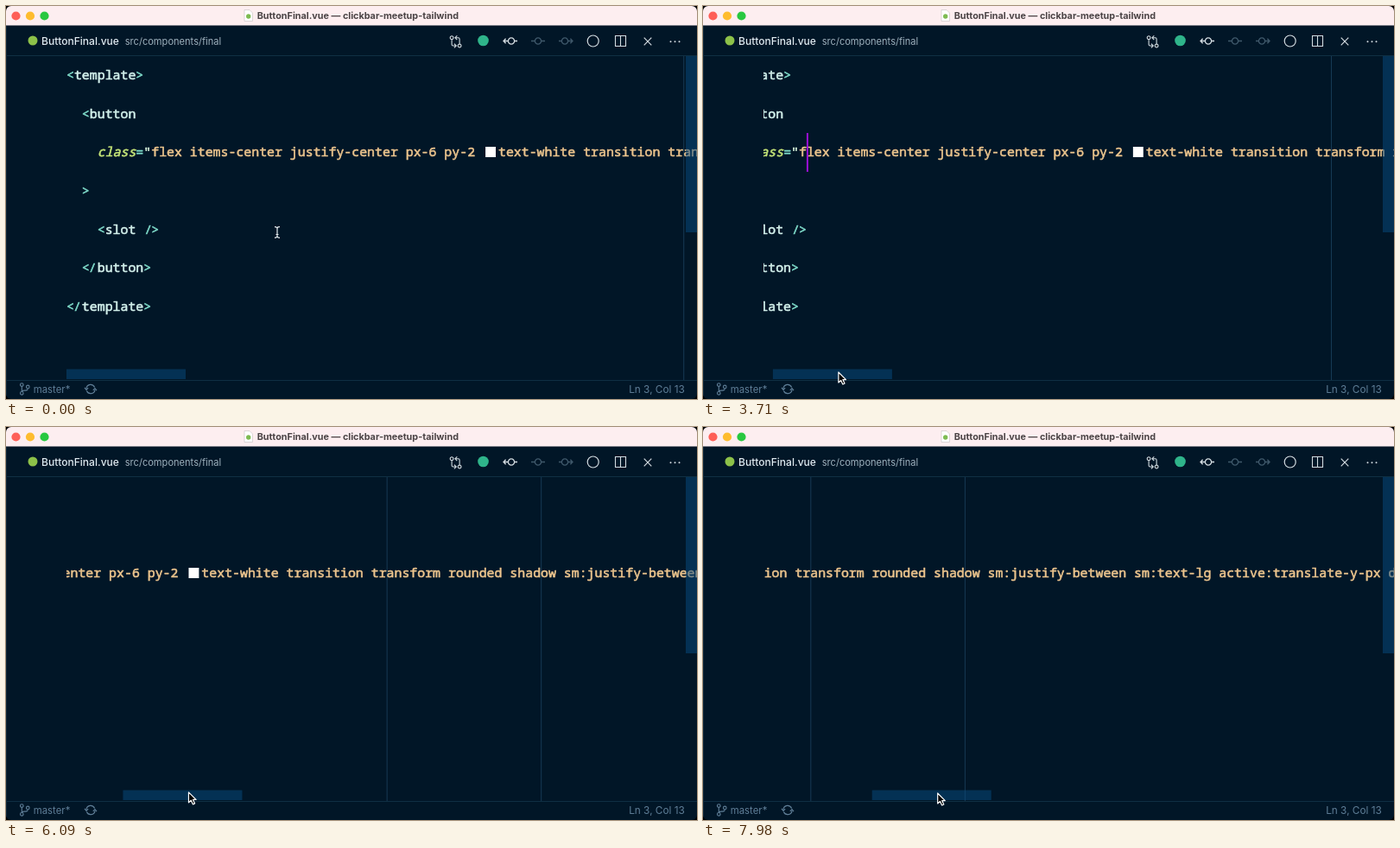
An HTML page with a canvas that plays this animation: 800x455 px, repeating every 8000 ms.

```html
<!DOCTYPE html>
<html lang="en">
<head>
<meta charset="utf-8">
<title>Editor scroll</title>
<style>
  html, body { margin: 0; width: 100%; height: 100%; overflow: hidden; background: #000; }
  canvas { display: block; width: 800px; height: 455px; }
</style>
</head>
<body>
<canvas id="stage"></canvas>
<script>
const W = 800, H = 455, LOOP = 8000, STEP = 70;
const canvas = document.getElementById('stage');
const ctx = canvas.getContext('2d');
const dpr = window.devicePixelRatio || 1;
canvas.width = W * dpr;
canvas.height = H * dpr;

const BG = '#011627', EDGE = '#0f2f43', ICON = '#d3dbe0', DIM = '#3f586a', STATUS = '#5f7e97';
const BRACKET = '#7fdbca', TAG = '#d3f0eb', ATTR = '#c5e478', QUOTE = '#d9f5dd', STRING = '#ecc48d';
const SANS = 'Inter, sans-serif';

// Code grid
const EM = 14.88, CELL = EM * 0.6, LEFT = 70, TOP = 57, BOTTOM = 433;
const BASE = 85.2, PITCH = 44.6;
const MONO = `${EM}px "Noto Sans Mono", monospace`;
const LEAD = 'flex items-center justify-center px-6 py-2 ';
const TAIL = 'text-white transition transform rounded shadow sm:justify-between ' +
             'sm:text-lg active:translate-y-px disabled:opacity-50';

// Pointer path: time, x, y
const PATH = [
  [0, 314, 262], [900, 314, 262], [2100, 148, 413], [2300, 148, 413],
  [2600, 146, 424], [2750, 146, 424], [3710, 156.9, 424], [4410, 168.9, 423],
  [5320, 190.9, 424], [6860, 233.8, 421.7], [7980, 271.7, 424]
];
const GRAB_X = 146, RATIO = 5.25, DRAG_START = 2750;

// Monotone cubic interpolation of one column of PATH
function track(t, col) {
  const slope = i => (PATH[i + 1][col] - PATH[i][col]) / (PATH[i + 1][0] - PATH[i][0]);
  const tangent = i => {
    if (i === 0) return slope(0);
    if (i === PATH.length - 1) return slope(i - 1);
    const a = slope(i - 1), b = slope(i);
    return a * b <= 0 ? 0 : 2 * a * b / (a + b);
  };
  let i = 0;
  while (i < PATH.length - 2 && t >= PATH[i + 1][0]) i++;
  const d = PATH[i + 1][0] - PATH[i][0];
  const u = Math.min(1, (t - PATH[i][0]) / d), v = 1 - u;
  return PATH[i][col] * (1 + 2 * u) * v * v + tangent(i) * d * u * v * v +
         PATH[i + 1][col] * u * u * (3 - 2 * u) - tangent(i + 1) * d * u * u * v;
}

function rect(x, y, w, h, color) {
  ctx.fillStyle = color;
  ctx.fillRect(x, y, w, h);
}

function disc(x, y, r, color) {
  ctx.fillStyle = color;
  ctx.beginPath();
  ctx.arc(x, y, r, 0, Math.PI * 2);
  ctx.fill();
}

function label(text, x, y, font, color, align = 'left') {
  ctx.font = font;
  ctx.fillStyle = color;
  ctx.textAlign = align;
  ctx.fillText(text, x, y);
}

// Outline icon, path given around its own centre
function icon(x, y, path, color, width = 1.1) {
  ctx.save();
  ctx.translate(x, y);
  ctx.strokeStyle = color;
  ctx.lineWidth = width;
  ctx.stroke(new Path2D(path));
  ctx.restore();
}

const ring = (x, y, r) => `M${x + r} ${y}a${r} ${r} 0 1 0 ${-2 * r} 0a${r} ${r} 0 1 0 ${2 * r} 0`;

const COMPARE = ring(-4.4, -4.3, 1.9) + ring(4.6, 5, 1.9) +
  'M-4.4 -2.4V3.5Q-4.4 5 -2.9 5H0.6M-1.6 2.6L0.8 5L-1.6 7.4' +
  'M4.6 3.1V-2.8Q4.6 -4.3 3.1 -4.3H-0.4M1.8 -6.7L-0.6 -4.3L1.8 -1.9';
const COMMIT = ring(0, 0, 3.6) + 'M-8 0H-3.6M3.6 0H8';
const PREV = ring(1, 0, 3.6) + 'M-8 0H-2.6M4.6 0H8M-5.4 -2.8L-8 0L-5.4 2.8';
const NEXT = ring(-1, 0, 3.6) + 'M-8 0H-4.6M2.6 0H8M5.4 -2.8L8 0L5.4 2.8';
const SPLIT = 'M-6 -6H6V6H-6ZM0 -6V6';
const CLOSE = 'M-4.3 -4.3L4.3 4.3M4.3 -4.3L-4.3 4.3';
const BRANCH = ring(-3.2, -4.8, 1.8) + ring(-3.2, 5, 1.8) + ring(3.8, -2.4, 1.8) +
  'M-3.2 -3V3.2M3.8 -0.6Q3.8 1.8 1 1.8H-0.6Q-3.2 1.8 -3.2 3.2';
const SYNC = 'M-5 -0.8A5 5 0 0 1 4.6 -2M5 0.8A5 5 0 0 1 -4.6 2' +
  'M-7 -1.6L-5 0.8L-2.8 -1.4M7 1.6L5 -0.8L2.8 1.4';

function drawTitleBar() {
  rect(0, 0, W, 22.5, '#fdeef0');
  ['#fe5f57', '#febc2e', '#28c840'].forEach((c, i) => disc(11.5 + i * 16.5, 11.5, 5.1, c));
  ctx.fillStyle = '#fff';
  ctx.strokeStyle = '#cfc8c9';
  ctx.lineWidth = 0.7;
  const page = new Path2D('M276 4.5H282L285.5 8V17.5H276Z');
  ctx.fill(page);
  ctx.stroke(page);
  disc(280.7, 12, 2.7, '#7dbb52');
  label('ButtonFinal.vue — clickbar-meetup-tailwind', 407.3, 15.2, `700 10.8px ${SANS}`, '#4b4446', 'center');
}

function drawTabBar() {
  rect(0, TOP, W, 1, EDGE);
  disc(31, 40, 5.5, '#8dc149');
  label('ButtonFinal.vue', 41, 45.3, `500 12.05px ${SANS}`, '#e0eaf0');
  label('src/components/final', 137.7, 45.3, `11.1px ${SANS}`, '#9fb1bd');
  icon(520.5, 41, COMPARE, ICON);
  disc(552.5, 40, 6.3, '#2fb48a');
  icon(584, 40.5, PREV, ICON, 1.3);
  icon(616, 40.5, COMMIT, DIM, 1.3);
  icon(648, 40.5, NEXT, DIM, 1.3);
  icon(679.7, 40.5, ring(0, 0, 6.5), ICON, 1.2);
  icon(711.5, 40.5, SPLIT, ICON);
  icon(743, 41, CLOSE, ICON, 1.2);
  for (let i = -1; i <= 1; i++) disc(774.5 + i * 5, 41.2, 1, ICON);
}

function drawStatusBar() {
  rect(0, BOTTOM, W, 1, EDGE);
  icon(21.5, 443.3, BRANCH, STATUS);
  label('master*', 31.7, 447.6, `11.4px ${SANS}`, STATUS);
  icon(98, 443.5, SYNC, STATUS, 1.2);
  label('Ln 3, Col 13', 785.8, 447.6, `11.8px ${SANS}`, STATUS, 'right');
}

// Parts are [column, text, colour, optional font style, optional nudge].
// A thin stroke gives the medium weight the font lacks.
function codeLine(row, parts) {
  ctx.lineWidth = 0.6;
  ctx.lineJoin = 'round';
  for (const [col, text, color, style = '', nudge = 0] of parts) {
    const x = LEFT + col * CELL + nudge, y = BASE + row * PITCH;
    label(text, x, y, `${style} ${MONO}`, color);
    ctx.strokeStyle = color;
    ctx.strokeText(text, x, y);
  }
}

function closeTag(row, col, name) {
  codeLine(row, [
    [col, '<', BRACKET], [col + 1, '/', BRACKET, '', -1],
    [col + 2, name, TAG], [col + 2 + name.length, '>', BRACKET]
  ]);
}

function drawCode() {
  codeLine(0, [[0, '<', BRACKET], [1, 'template', TAG], [9, '>', BRACKET]]);
  codeLine(1, [[2, '<', BRACKET], [3, 'button', TAG]]);
  const mark = 11 + LEAD.length;
  codeLine(2, [
    [4, 'class', ATTR, 'italic'], [9, '=', BRACKET], [10, '"', QUOTE],
    [11, LEAD, STRING], [mark, TAIL, STRING, '', 1.2 * EM]
  ]);
  rect(LEFT + mark * CELL + 0.2 * EM, 163, 0.8 * EM, 12, '#fff');
  codeLine(3, [[2, '>', BRACKET]]);
  codeLine(4, [[4, '<', BRACKET], [5, 'slot', TAG], [10, '/', BRACKET, '', 1], [11, '>', BRACKET]]);
  closeTag(5, 2, 'button');
  closeTag(6, 0, 'template');
}

function drawEditor(t, scroll) {
  ctx.save();
  ctx.beginPath();
  ctx.rect(LEFT, TOP + 1, W - LEFT, BOTTOM - TOP - 1);
  ctx.clip();
  ctx.translate(-scroll, 0);
  for (const col of [80, 100]) rect(LEFT + col * CELL, TOP, 1, BOTTOM - TOP, '#173a55');
  drawCode();
  if ((t + 520) % 1000 < 500) rect(LEFT + 12 * CELL, 147, 2, 45, '#9b10d6');
  ctx.restore();
  const slider = 'rgba(8, 77, 129, 0.5)';
  rect(787, TOP + 1, 13, 204, slider);
  rect(LEFT + scroll / RATIO, 420.5, 138, 11.5, slider);
}

function drawPointer(x, y) {
  ctx.save();
  ctx.translate(x, y);
  ctx.lineJoin = 'round';
  if (y > 419) {
    const arrow = new Path2D('M0 0V12L2.8 9.4L4.9 14L7.1 13L5 8.6H8.6Z');
    ctx.fillStyle = '#000';
    ctx.strokeStyle = '#fff';
    ctx.lineWidth = 1.2;
    ctx.fill(arrow);
    ctx.stroke(arrow);
  } else {
    const beam = new Path2D('M-3 -6.3Q0 -6.3 0 -4.5Q0 -6.3 3 -6.3M0 -4.5V4.5M-3 6.3Q0 6.3 0 4.5Q0 6.3 3 6.3M-1.5 2.5H1.5');
    ctx.strokeStyle = '#e8edf0';
    ctx.lineWidth = 1.2;
    ctx.stroke(beam);
  }
  ctx.restore();
}

function draw(t) {
  const x = track(t, 1), y = track(t, 2);
  const scroll = t < DRAG_START ? 0 : (x - GRAB_X) * RATIO;
  ctx.setTransform(dpr, 0, 0, dpr, 0, 0);
  rect(0, 0, W, H, '#000');
  ctx.save();
  ctx.beginPath();
  ctx.roundRect(0, 0, W, H, 6);
  ctx.clip();
  rect(0, 0, W, H, BG);
  drawTitleBar();
  drawTabBar();
  drawEditor(t, scroll);
  drawStatusBar();
  rect(0, 23, 1, H - 23, '#12293a');
  drawPointer(x, y);
  ctx.restore();
}

const start = performance.now();
function tick() {
  const t = (performance.now() - start) % LOOP;
  draw(Math.floor(t / STEP) * STEP);
  requestAnimationFrame(tick);
}
tick();
</script>
</body>
</html>
```
